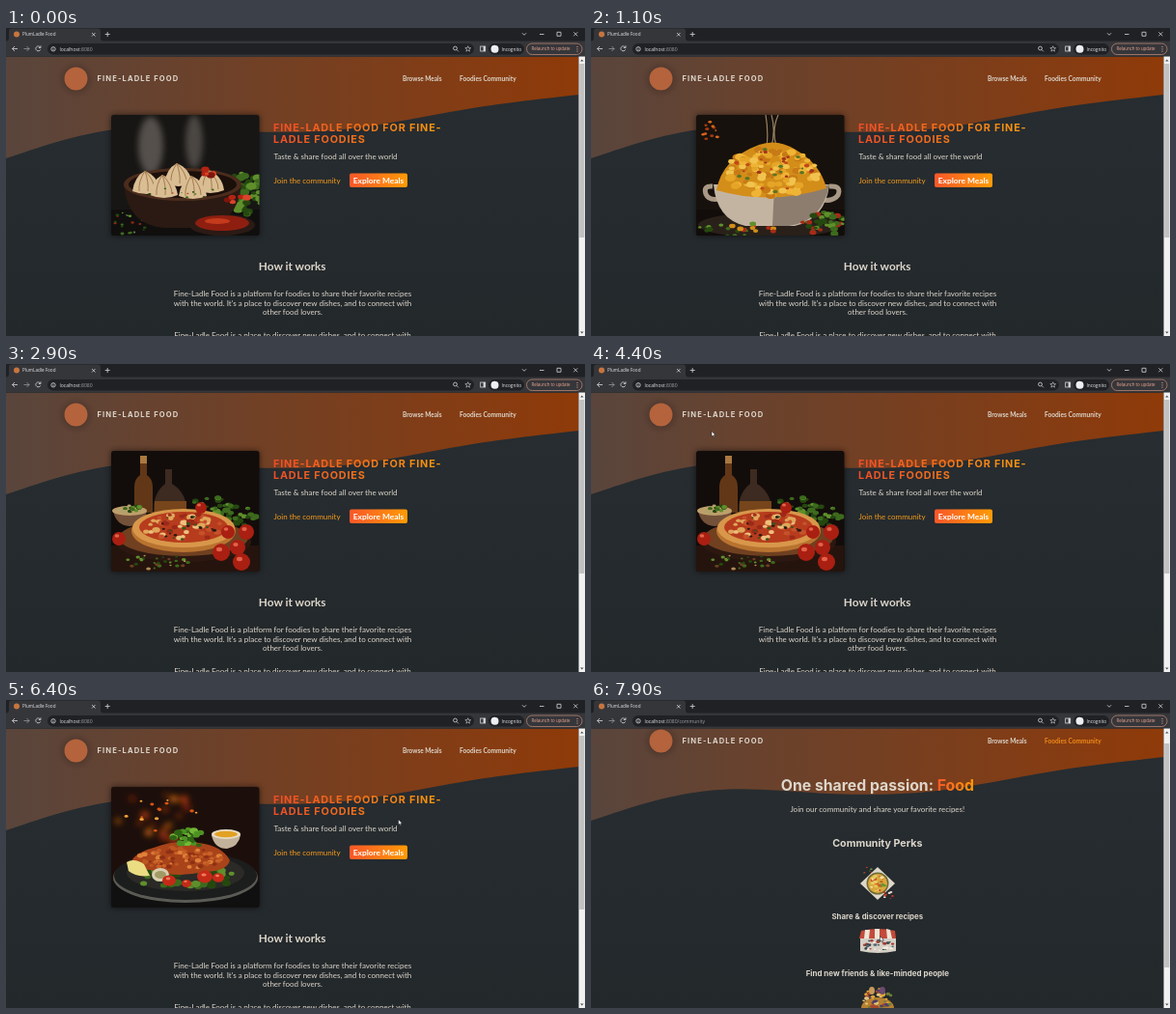
These frames come from a looping animation (600 by 319 pixels, 8000 ms). An HTML page:

```html
<!DOCTYPE html>
<html lang="en">
<head>
<meta charset="utf-8">
<title>PlumLadle Food</title>
<style>
  html, body { margin: 0; width: 100%; height: 100%; overflow: hidden; background: #252a2e; }
  svg { display: block; }
  text { fill: #ddd6cb; }
  .ui { font-family: "Open Sans", sans-serif; fill: #e4e6ea; }
  .body { font-family: Lato, sans-serif; font-size: 8px; }
  .bold { font-family: Lato, sans-serif; font-weight: 700; }
  .head { font-family: Inter, sans-serif; font-weight: 700; }
  .mid { text-anchor: middle; }
  .line { fill: none; stroke: #d5d7da; stroke-width: .8; }
</style>
</head>
<body>
<svg width="600" height="319" viewBox="0 0 600 319">
  <defs>
    <linearGradient id="bg" x2="0" y2="1"><stop stop-color="#282e32"/><stop offset="1" stop-color="#23282b"/></linearGradient>
    <linearGradient id="wave"><stop stop-color="#59453c"/><stop offset="1" stop-color="#8f3a09"/></linearGradient>
    <linearGradient id="hot"><stop stop-color="#f9572a"/><stop offset="1" stop-color="#ff9b05"/></linearGradient>
    <linearGradient id="title" gradientUnits="userSpaceOnUse" x1="277" x2="455"><stop stop-color="#f04c28"/><stop offset="1" stop-color="#f99a0c"/></linearGradient>
    <filter id="blur" x="-50%" y="-50%" width="200%" height="200%"><feGaussianBlur stdDeviation="3"/></filter>
    <clipPath id="frame"><rect x="109" y="90" width="153.500" height="125" rx="2.500"/></clipPath>
  </defs>

  <rect width="600" height="319" fill="url(#bg)"/>
  <g id="page">
    <path transform="translate(0 29.500) scale(.412)" fill="url(#wave)" d="M0,256L48,240C96,224,192,192,288,181.300C384,171,480,181,576,186.700C672,192,768,192,864,181.300C960,171,1056,149,1152,133.300C1248,117,1344,107,1392,101.300L1440,96V0H0Z"/>
    <circle cx="72.500" cy="53" r="13" fill="#1d1512" opacity=".4" filter="url(#blur)"/>
    <circle cx="72.500" cy="52.500" r="12" fill="#b4633c"/>
    <text class="head" x="94.500" y="55.300" font-size="7.600" letter-spacing="1.100">FINE-LADLE FOOD</text>
    <text class="bold" x="411" y="55.200" font-size="6.500">Browse Meals</text>
    <text class="bold" id="link" x="470" y="55.200" font-size="6.600">Foodies Community</text>

    <g id="home">
      <rect x="109" y="90" width="153.500" height="125" rx="2.500" fill="#000" opacity=".6" filter="url(#blur)"/>
      <g id="slides" clip-path="url(#frame)"></g>
      <g class="head" font-size="10.800" letter-spacing=".85">
        <text x="277" y="107" style="fill:url(#title)">FINE-LADLE FOOD FOR FINE-</text>
        <text x="277" y="118.700" style="fill:url(#title)">LADLE FOODIES</text>
      </g>
      <text class="body" x="277.500" y="136">Taste &amp; share food all over the world</text>
      <text class="body" x="277.500" y="160.500" style="fill:#f39a1c">Join the community</text>
      <rect x="356" y="150.500" width="60" height="14.500" rx="2" fill="url(#hot)"/>
      <text class="bold mid" x="386" y="160.500" font-size="8.400" style="fill:#fff">Explore Meals</text>
      <text class="bold mid" x="296.700" y="251" font-size="11.800">How it works</text>
      <g class="body mid">
        <text x="297" y="278">Fine-Ladle Food is a platform for foodies to share their favorite recipes</text>
        <text x="297" y="287.500">with the world. It's a place to discover new dishes, and to connect with</text>
        <text x="297" y="297">other food lovers.</text>
        <text x="297" y="321">Fine-Ladle Food is a place to discover new dishes, and to connect with</text>
      </g>
    </g>

    <g id="community" class="mid">
      <text class="head" x="296.800" y="104.300" font-size="15.800">One shared passion: <tspan fill="url(#hot)" id="food">Food</tspan></text>
      <text class="body" x="296.800" y="125.500" font-size="8.100">Join our community and share your favorite recipes!</text>
      <text class="head" x="296.800" y="162" font-size="10.700">Community Perks</text>
      <g id="perks"></g>
      <text class="head" x="296.800" y="237" font-size="7.850">Share &amp; discover recipes</text>
      <text class="head" x="296.800" y="296" font-size="7.950">Find new friends &amp; like-minded people</text>
    </g>
  </g>

  <g id="browser">
    <rect width="600" height="29.500" fill="#202124"/>
    <path d="M0 13.500Q3 13.500 3 10.500V3.500Q3 .5 6 .5H95Q98 .5 98 3.500V10.500Q98 13.500 101 13.500H600V29.500H0Z" fill="#35363a"/>
    <circle cx="11" cy="6.500" r="3" fill="#c8743f"/>
    <text class="ui" x="17" y="8.300" font-size="4.600">PlumLadle Food</text>
    <rect x="43" y="16" width="442" height="11.500" rx="5.700" fill="#202124"/>
    <text class="ui" x="55.500" y="23.600" font-size="5.050">localhost<tspan fill="#9aa0a6">:8080<tspan id="path"></tspan></tspan></text>
    <g class="line">
      <path d="M89 5l3.500 3.500m0-3.500l-3.500 3.500M102.700 6.500h5m-2.500-2.500v5M535 5.300l2 2l2-2M553 6.500h4.500M571 4.300h4v4h-4zM588.300 4.300l4 4m0-4l-4 4"/>
      <path d="M12 21.500H6.500m2.500-2.500l-2.500 2.500l2.500 2.500"/>
      <path d="M18.500 21.500H24m-2.500-2.500l2.500 2.500l-2.500 2.500" opacity=".6"/>
      <path d="M35.500 20a2.500 2.500 0 1 0 .2 2.300M36 18.300v2.200h-2.200"/>
      <circle cx="49" cy="21.800" r="2.200"/><path d="M49 21.500v1.500m0-2.600v.5"/>
      <circle cx="465.500" cy="21" r="1.900"/><path d="M467 22.500l1.800 1.800"/>
      <path d="M478.700 18.700l.8 2h2.100l-1.700 1.400.6 2.100-1.800-1.200-1.800 1.200.6-2.100-1.700-1.400h2.100z" stroke-width=".6"/>
      <rect x="491.700" y="19" width="5" height="5"/><path d="M495.600 19v5" stroke-width="2"/>
      <rect x="539.500" y="16" width="57.500" height="11.500" rx="5.700" style="stroke:#b98572"/>
    </g>
    <rect x="500" y="16" width="37" height="11.500" rx="5.700" fill="#202124"/>
    <circle cx="506.500" cy="21.800" r="4" fill="#eceef0"/>
    <text class="ui" x="513.500" y="23.500" font-size="4.750">Incognito</text>
    <text class="ui" x="544.500" y="23.400" font-size="4.400" style="fill:#f0a793">Relaunch to update</text>
    <path d="M592 19v1m0 1.300v1m0 1.300v1" stroke="#f0a793"/>
  </g>

  <rect x="593.500" y="29.500" width="6.500" height="290" fill="#f1f1f1"/>
  <rect id="thumb" x="594.200" width="5.100" fill="#c1c1c1"/>
  <path d="M595 34.500l1.800-2l1.800 2zM595 314.500l1.800 2l1.800-2z" fill="#555"/>
  <path id="cursor" d="M0 0V5.600L1.300 4.500L2.200 6.600L3.100 6.200L2.200 4.200H4Z" fill="#fff" stroke="#111" stroke-width=".5"/>
</svg>

<script>
const $ = id => document.getElementById(id);

let seed = 7;
const rand = () => (seed = seed * 16807 % 2147483647) / 2147483647;
const oval = (x, y, rx, ry, fill, more = '') =>
  `<ellipse cx="${x}" cy="${y}" rx="${rx}" ry="${ry}" fill="${fill}" ${more}/>`;
const shape = (d, fill, more = '') => `<path d="${d}" fill="${fill}" ${more}/>`;
const backdrop = (wall, table) =>
  `<rect x="95" y="80" width="185" height="150" fill="${wall}"/>` +
  shape('M95 188H280V230H95Z', table);
const soft = 'filter="url(#blur)"';

// Random small ovals inside an ellipse
function scatter(n, x, y, rx, ry, size, colors) {
  let out = '';
  for (let i = 0; i < n; i++) {
    const a = rand() * 6.283, r = Math.sqrt(rand()), s = size * (.5 + rand() * .6);
    const px = x + Math.cos(a) * r * rx, py = y + Math.sin(a) * r * ry;
    out += oval(px.toFixed(1), py.toFixed(1), s.toFixed(1), (s * .7).toFixed(1), colors[i % colors.length]);
  }
  return out;
}

const greens = ['#3d6a1d', '#25480f', '#5f8f2b'];
const reds = ['#b32413', '#d8452a', '#7e150c'];

const dumpling = (x, y) =>
  shape(`M${x - 15} ${y + 9}Q${x - 13} ${y - 6} ${x - 2} ${y - 12}Q${x + 12} ${y - 6} ${x + 14} ${y + 9}Q${x} ${y + 15} ${x - 15} ${y + 9}Z`, '#d9bd93') +
  shape(`M${x - 2} ${y - 12}Q${x - 9} ${y - 1} ${x - 8} ${y + 9}M${x - 2} ${y - 12}Q${x + 2} ${y} ${x + 1} ${y + 9}M${x - 2} ${y - 12}Q${x + 8} ${y - 2} ${x + 8} ${y + 8}`,
    'none', 'stroke="#a37a4e" stroke-width="1"');

const photos = [
  () => backdrop('#171614', '#100f0e') +
    oval(150, 122, 13, 30, '#77706a', soft + ' opacity=".65"') + oval(195, 118, 9, 28, '#77706a', soft + ' opacity=".55"') +
    scatter(45, 248, 170, 18, 24, 5, greens) + scatter(24, 128, 202, 20, 12, 1.8, [...greens, '#8f2615', '#77736a']) +
    shape('M122 162Q126 205 165 207H203Q240 203 244 162Z', '#2a1a13') + oval(183, 162, 61, 17, '#4b2c1d') + oval(183, 162, 56, 14, '#1b0f0a') +
    dumpling(146, 160) + dumpling(212, 159) + dumpling(179, 152) + dumpling(164, 164) + dumpling(194, 165) +
    scatter(8, 212, 149, 8, 5, 4, reds) + scatter(10, 183, 170, 40, 6, 1.5, [...greens, '#c03a1c']) +
    oval(224, 204, 34, 11, '#2b1a15') + oval(224, 202, 28, 8, '#8e1f10') + oval(219, 200, 13, 3, '#c43a1c') +
    scatter(5, 240, 178, 14, 4, 4, reds),

  () => backdrop('#17110d', '#120d0a') +
    scatter(12, 124, 107, 9, 10, 2, ['#a33b10', '#d9691c']) +
    shape('M181 90Q184 107 182 124M187 90Q192 108 186 126M194 90Q187 106 192 122', 'none', 'stroke="#d0b184" stroke-width="1.2" opacity=".7"') +
    oval(185, 204, 74, 13, '#29201a') +
    shape('M126 164Q116 163 119 172Q122 179 133 177M247 164Q260 163 256 173Q251 180 240 178', 'none', 'stroke="#a89885" stroke-width="5"') +
    shape('M127 162Q130 198 160 205H211Q243 198 247 162Z', '#c3b4a2') + shape('M190 164Q225 170 247 162Q240 200 205 205H188Z', '#8d7d6e') +
    shape('M130 168Q136 135 174 121Q193 114 212 126Q238 141 244 166Q185 184 130 168Z', '#d38d19') +
    scatter(120, 187, 150, 48, 25, 5, ['#e5a527', '#f1c34e', '#c77a15', '#efb436']) +
    scatter(30, 188, 146, 42, 24, 2.5, ['#a5331a', '#c24719', '#5b7422']) +
    scatter(38, 243, 202, 24, 12, 4, [...greens, '#a62b16']) + scatter(24, 150, 209, 42, 7, 3.3, [...greens, '#d38d19', '#a62b16']),

  () => backdrop('#120d0b', '#25140d') +
    shape('M139 95H146V115Q152 119 152 127V154H133V127Q133 119 139 115Z', '#613718') + shape('M139 95H146V103H139Z', '#aa793f') +
    shape('M165 109H172V124Q188 134 187 154H153Q152 134 165 124Z', '#3d2a20') + shape('M154 142H187V155H154Z', '#76451b') +
    shape('M111 152H146Q144 167 128 168Q114 167 111 152Z', '#745139') + oval(128, 152, 18, 5, '#bda06b') + scatter(16, 128, 150, 13, 4, 3, [...greens, '#b3a16b']) +
    scatter(34, 236, 157, 23, 13, 4, greens) + scatter(15, 215, 144, 20, 8, 3, greens) +
    oval(184, 184, 70, 21, '#2c1810') + oval(184, 180, 67, 19, '#704020') +
    oval(184, 173, 54, 22, '#b87330') + oval(184, 170, 53, 20, '#d8974a') + oval(184, 169, 46, 16, '#b63c1d') +
    scatter(50, 184, 169, 42, 14, 4, ['#e0a65b', '#c5522a', '#eebf7d', '#9c2a18']) + scatter(20, 184, 169, 39, 13, 2, ['#36561b', '#2c1913']) +
    [[223, 195, 9], [240, 190, 8], [249, 174, 8], [230, 174, 7], [244, 205, 9], [202, 149, 6], [117, 181, 7]].map(([x, y, r]) =>
      oval(x, y, r, r, '#a91f12') + oval(x - 2, y - 3, r / 3, r / 4, '#e2634a')).join('') +
    scatter(28, 153, 205, 36, 8, 2.2, [...greens, '#6b4024', '#b08959']),

  () => backdrop('#1c0f0b', '#111010') +
    `<g ${soft}>${scatter(22, 155, 122, 42, 28, 4.5, ['#bb3e0c', '#ed7415', '#85220a'])}</g>` +
    scatter(13, 157, 120, 44, 26, 2.2, ['#d65612', '#f3a13a']) +
    oval(186, 184, 75, 26, '#5b5b56') + oval(186, 182, 74, 25, '#1c1d1d') + oval(186, 179, 61, 19, '#2b2a27') +
    shape('M213 140Q216 154 229 154Q241 152 243 140Z', '#c3b29a') + oval(228, 139, 15, 5, '#e8dcc4') + oval(228, 139, 12, 3.3, '#e2a124') +
    scatter(40, 188, 184, 58, 10, 5, greens) +
    shape('M129 168Q135 157 153 153Q177 144 200 148Q224 151 232 166Q229 178 204 178Q176 185 150 176Q134 176 129 168Z', '#a9431a') +
    scatter(80, 181, 164, 44, 11, 3, ['#bd5720', '#df8038', '#8e3013', '#c96229']) +
    scatter(32, 190, 143, 17, 10, 4, ['#4d9223', '#2e6514', '#73b835']) +
    shape('M125 168Q133 163 143 170L149 182Q135 184 127 177Z', '#eadd82') + oval(160, 181, 9, 7, '#d8cfb0') + oval(160, 181, 6, 4, '#a29a65') +
    [[169, 187, 7], [206, 183, 8], [220, 184, 6], [187, 190, 5]].map(([x, y, r]) => oval(x, y, r, r * .8, '#c42a18') + oval(x - 1, y - 2, r / 3, r / 5, '#f07b57')).join(''),

  () => backdrop('#191512', '#21160f') +
    oval(185, 187, 70, 20, '#3b2418') + shape('M122 162Q126 204 164 206H207Q243 203 248 162Z', '#342a24') + oval(185, 162, 63, 17, '#56463a') +
    scatter(55, 185, 151, 53, 20, 8, [...greens, ...reds]) + scatter(25, 185, 150, 45, 17, 3, ['#e9d9bd', '#d14a2c'])
];
$('slides').innerHTML = photos.map(draw => `<g>${draw()}</g>`).join('');

$('perks').innerHTML =
  shape('M279 200L297 183L315 200L297 217Z', '#ded8cb') + oval(297, 200, 11.5, 11.5, '#6f6a35') + oval(297, 200, 10, 10, '#d9a83c') +
  scatter(34, 297, 200, 8, 8, 2, ['#e8c64f', '#cc5a24', '#6a9434', '#f1dfa2']) + scatter(9, 308, 212, 6, 4, 1.4, ['#c53a24', '#e8e0d2']) + scatter(6, 287, 187, 6, 4, 1.2, ['#c53a24', '#6a9434']) +
  shape('M280 249Q297 245 315 249L316 257H278Z', '#c44a3b') + shape('M284 248l-1 9h5l1-9zM294 247v10h5v-10zM306 247l1 10h5l-2-9z', '#eee5d8') +
  shape('M279 257H316V270Q297 274 279 270Z', '#d5cfc6') + scatter(34, 297, 264, 17, 6, 2, ['#a83b2f', '#38454b', '#f0eadf', '#53666c']) +
  oval(297, 329, 17, 11, '#b58031') + scatter(45, 297, 321, 15, 12, 2.6, ['#dfa638', '#a9472a', '#6b7c37', '#4b3d6c', '#e4c47e']) +
  oval(291, 311, 3, 4, '#c79a58') + oval(302, 311, 3, 4, '#6d4a70');
$('food').style.fill = 'url(#title2)';
document.querySelector('defs').insertAdjacentHTML('beforeend',
  '<linearGradient id="title2" gradientUnits="userSpaceOnUse" x1="358" x2="398"><stop stop-color="#f9572a"/><stop offset="1" stop-color="#ff9b05"/></linearGradient>');

const LOOP = 8000, STEP = 100, FADE = 200;
const HOVER = 6900, VISIT = 7200, SCROLL = 7900;
const starts = [-2000, 300, 2350, 4450, 6550, 9000];
const track = [[4200, 72, 33], [4400, 125, 69.5], [5000, 206, 88.5], [5200, 212, 94],
  [5800, 352, 165], [6050, 352, 165], [6900, 500, 53], [7300, 500, 53], [7800, 299.5, 244.5], [8000, 299.5, 244.5]];

const ease = x => { x = Math.min(1, Math.max(0, x)); return x * x * (3 - 2 * x); };
const show = (id, on) => $(id).setAttribute('display', on ? 'inline' : 'none');

function moveCursor(t) {
  show('cursor', t >= track[0][0]);
  const i = track.findIndex(p => p[0] > t);
  if (i < 1) return;
  const [t0, x0, y0] = track[i - 1], [t1, x1, y1] = track[i];
  const k = ease((t - t0) / (t1 - t0));
  $('cursor').setAttribute('transform', `translate(${x0 + (x1 - x0) * k} ${y0 + (y1 - y0) * k})`);
}

function moveSlides(t) {
  [...$('slides').children].forEach((slide, i) => {
    const a = ease((t - starts[i]) / FADE) * (1 - ease((t - starts[i + 1]) / FADE)), off = 1 - a;
    slide.setAttribute('opacity', a);
    slide.setAttribute('transform',
      `translate(185.7 152.5) scale(${1 + .1 * off}) translate(${-6 * off} 0) rotate(${-5 * off}) translate(-185.7 -152.5)`);
  });
}

function render(now) {
  const t = Math.floor(now % LOOP / STEP) * STEP;
  const visited = t >= VISIT, scroll = t >= SCROLL ? 10 : 0;
  moveSlides(t);
  moveCursor(t);
  show('home', !visited);
  show('community', visited);
  $('page').setAttribute('transform', `translate(0 ${-scroll})`);
  $('link').style.fill = t >= HOVER ? '#f08a1a' : '';
  $('path').textContent = visited ? '/community' : '';
  $('thumb').setAttribute('y', 37 + scroll * .8);
  $('thumb').setAttribute('height', visited ? 232 : 180);
}

let origin;
function tick(now) {
  origin ??= now;
  render(now - origin);
  requestAnimationFrame(tick);
}
render(0);
requestAnimationFrame(tick);
</script>
</body>
</html>
```
